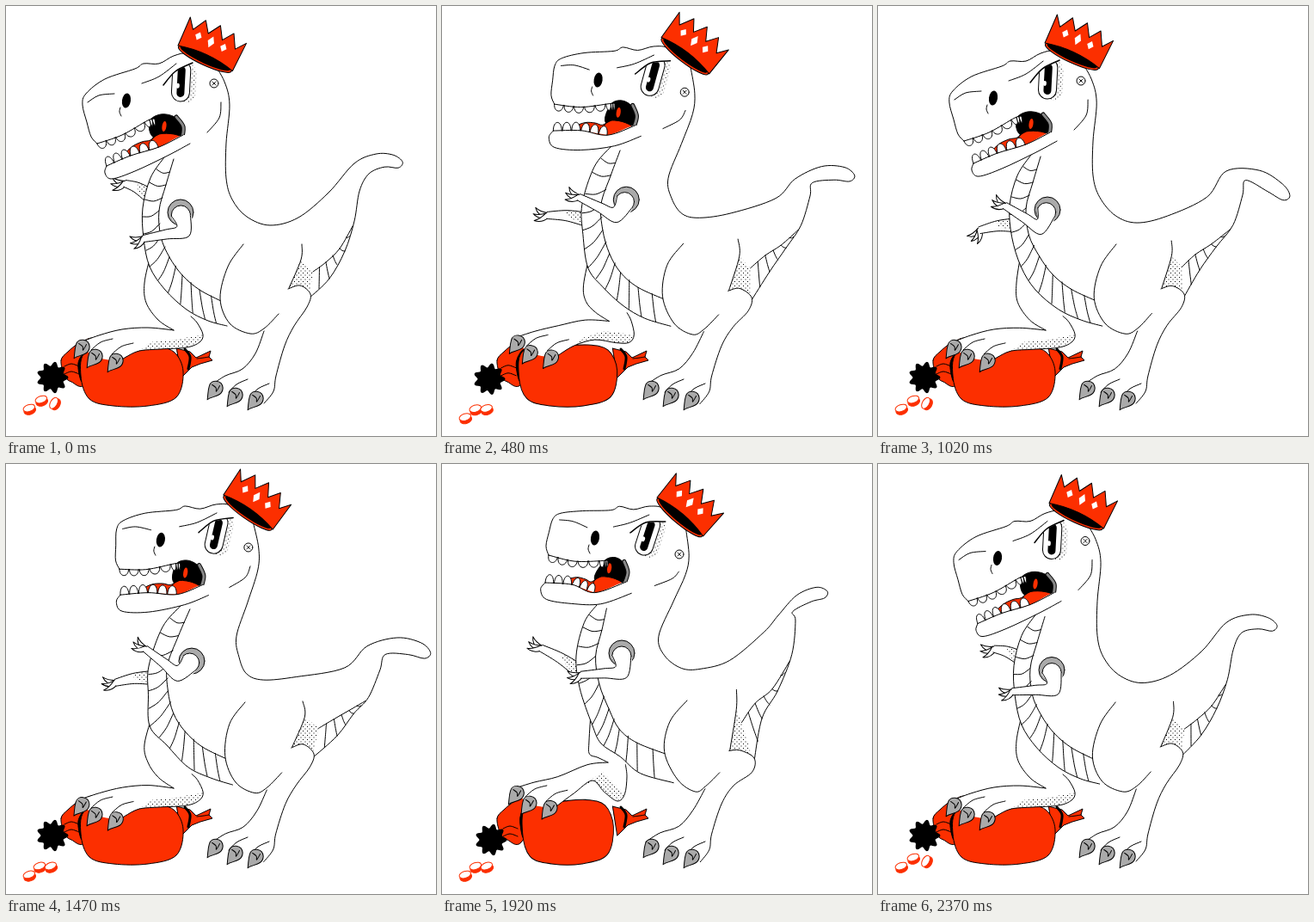
An HTML page with a canvas for the animation above (2400 ms loop, 500x500 px).

```html
<!DOCTYPE html>
<html lang="en">
<head>
<meta charset="utf-8">
<title>Stomping dinosaur</title>
<style>
  html, body { margin: 0; height: 100%; overflow: hidden; background: #fff; }
  canvas { display: block; }
</style>
</head>
<body>
<canvas id="stage" width="500" height="500"></canvas>
<script>
const ctx = document.getElementById('stage').getContext('2d');
const RED = '#fc2f00', GREY = '#aaa', INK = '#000', PAPER = '#fff';
const { PI, cos, sin, hypot } = Math;

// The dinosaur is drawn once, leaning left; handles bend it into the other poses.
const shapes = {
  back: '240,64 254,88 260,115 256,160 256,200 263,225 280,245 307,255 340,246 375,217',
  tail: '405,183 430,172 450,173 461,181 456,188 440,187 422,195 411,215 405,250 394,285 376,317 352,340',
  tailInner: '403,256 388,282 372,298 357,309',
  belly: '184,176 168,200 159,235 160,270 167,303 185,330 210,353 235,366 257,372',
  bellyInner: '195,178 186,208 178,238 180,268 190,292 205,313 225,330 252,344',
  fold: '344,277 343,295 329,328',
  thigh: '276,277 258,303 249,340 260,369 284,381 300,375 317,358',
  knee: '328,329 342,325 354,335 350,350 335,372 324,395 314,430 311,448 300,462',
  shin: '300,378 290,404 275,422 255,430 240,440',
  farThigh: '168,290 161,322 163,345 177,365 195,377',
  footTop: '195,377 165,374 135,376 108,383 84,392',
  footBottom: '215,361 222,368 229,382 225,391 210,397 180,399 155,401 138,409 131,414',
  toes: '89,397 104,408 128,413',
  head: '240,64 213,55 195,58 178,67 160,67 150,73 115,85 93,102 89,115 94,135 99,152 106,160',
  lip: '106,160 135,150 165,133 173,131',
  mouth: '167,134 180,126 196,129 204,140 203,153 172,153',
  tongue: '138,174 146,164 158,158 168,156 178,149 195,149 203,154 180,164 160,169',
  jaw: '117,186 145,174 178,164 206,150 214,160 188,174 150,192 123,201 115,194',
  brow: '183,92 197,76 217,66',
  ridge: '158,90 178,82 198,67',
  snoutLine: '95,112 108,104 126,102',
  cheek: '250,112 248,130 234,147',
  spots: '140,110 203,90 242,90 184,140 200,46 203,240'
};
const parse = text => text.split(' ').map(pair => pair.split(',').map(Number));
for (const name in shapes) shapes[name] = parse(shapes[name]);

// x, y, then the shift when leaning right, with the foot lifted, and at the stomp
const upperHandles = [
  [140, 110, 40, -22, 38, -24], [242, 90, 40, 7, 34, 15], [106, 160, 26, -38, 18, -54],
  [117, 186, 16, -34, 3, -48], [204, 140, 24, -10, 10, -14], [200, 46, 53, -10, 50, -7],
  [256, 160, 25, 1, 13, 0], [184, 176, 19, -11, -4, -12], [203, 240, 13, -11, 6, -20],
  [159, 235, 7, 0, -3, -12], [256, 205, 11, 0, -5, 0], [308, 255, -8, -4, -6, -17],
].map(handle => [...handle, -6, -3]);
const lowerHandles = [
  [405, 183, 15, 29, -14, -7, 0, 9], [411, 215, 24, 25, 0, -33, 13, 5],
  [461, 181, 33, 39, -13, -33, 18, 40], [376, 317, 9, -1, -4, -21, -2, -10],
  [276, 277, 2, 0, 9, -2, 1, 0], [260, 369, 7, 1, 14, -2, 4, 0],
  [354, 335, 4, 2, 9, 7, 2, 0], [185, 330, 2, -3, 0, -5, -2, 0], [161, 322, 0, 4, 10, 0, 0, 0],
  [195, 377, 0, 0, -2, -30, 0, 0], [228, 385, 0, 0, -18, 2, 0, 0], [106, 404, 0, 0, -2, -13, 0, 0],
  [270, 450, 0, 0, 0, 0, 0, 0], [318, 415, 0, 0, 0, 0, 0, 0]
];
const handles = [...upperHandles, ...lowerHandles];

// Joint settings for the four poses
const joints = {
  tilt: [3, 13, 18, 3], upperArm: [82, 140, 92, 116], foreArm: [169, 218, 176, 212],
  farX: [165, 170, 160, 160], farY: [219, 249, 241, 255],
  farWristX: [138, 127, 115, 118], farWristY: [206, 255, 214, 261], farHand: [172, 168, 200, 120]
};

function poseWeights(time) {
  const stops = [45, 320, 720, 1010, 1245];
  let phase = time % 1200;
  if (phase < 45) phase += 1200;
  const i = stops.findIndex((s, k) => phase < stops[k + 1]);
  const x = (phase - stops[i]) / (stops[i + 1] - stops[i]);
  const w = [0, 0, 0, 0], s = x * x * (3 - 2 * x);
  w[i] = 1 - s;
  w[(i + 1) % 4] = s;
  // small follow-through on both leans
  return [1.1 * w[0] - 0.09 * w[1], 1.09 * w[1], w[2], w[3] - 0.1 * w[0]];
}

// Moving least squares: every point takes the turn, scale and shift of the handles near it.
function makeWarp([, lean, lift, stomp]) {
  const moved = handles.map(([x, y, ax, ay, bx, by, cx, cy]) =>
    [x, y, x + lean * ax + lift * bx + stomp * cx, y + lean * ay + lift * by + stomp * cy]);
  return ([x, y]) => {
    const weights = moved.map(h => 1 / ((h[0] - x) ** 2 + (h[1] - y) ** 2 + 9) ** 2);
    const total = weights.reduce((a, b) => a + b);
    const [mx, my, nx, ny] = [0, 1, 2, 3].map(j => moved.reduce((sum, h, i) => sum + h[j] * weights[i], 0) / total);
    let re = 0, im = 0, size = 0;
    moved.forEach((h, i) => {
      const px = h[0] - mx, py = h[1] - my, qx = h[2] - nx, qy = h[3] - ny;
      re += weights[i] * (px * qx + py * qy);
      im += weights[i] * (px * qy - py * qx);
      size += weights[i] * (px * px + py * py);
    });
    const dx = x - mx, dy = y - my;
    return [nx + (re * dx - im * dy) / size, ny + (im * dx + re * dy) / size];
  };
}

const dots = (() => {
  const tile = document.createElement('canvas');
  tile.width = tile.height = 5;
  const g = tile.getContext('2d');
  g.fillRect(0, 0, 1, 1);
  g.fillRect(2.5, 2.5, 1, 1);
  return ctx.createPattern(tile, 'repeat');
})();

// Catmull-Rom curve through the points
function trace(pts, closed) {
  const n = pts.length;
  const get = i => closed ? pts[(i + n) % n] : pts[Math.max(0, Math.min(n - 1, i))];
  ctx.beginPath();
  ctx.moveTo(...pts[0]);
  for (let i = 0; i < (closed ? n : n - 1); i++) {
    const [a, b, c, d] = [get(i - 1), get(i), get(i + 1), get(i + 2)];
    ctx.bezierCurveTo(b[0] + (c[0] - a[0]) / 6, b[1] + (c[1] - a[1]) / 6,
      c[0] - (d[0] - b[0]) / 6, c[1] - (d[1] - b[1]) / 6, c[0], c[1]);
  }
}

function paint(fill, line = INK, width = 1) {
  if (fill) { ctx.fillStyle = fill; ctx.fill(); }
  if (line) { ctx.strokeStyle = line; ctx.lineWidth = width; ctx.stroke(); }
}
const stroke = (pts, width) => { trace(pts); paint(null, INK, width); };
const strokes = (...lines) => lines.forEach(line => stroke(line));
const blob = (pts, fill) => { trace(pts, true); paint(fill); };
const area = (pts, fill) => { trace(pts); paint(fill, null); };

function poly(pts, fill, line = null) {
  ctx.beginPath();
  pts.forEach(p => ctx.lineTo(...p));
  ctx.closePath();
  paint(fill, line);
}

function oval(x, y, rx, ry, fill, line, tilt = 0) {
  ctx.beginPath();
  ctx.ellipse(x, y, rx, ry, tilt, 0, 2 * PI);
  paint(fill, line);
}

function place(x, y, degrees, draw) {
  ctx.save();
  ctx.translate(x, y);
  ctx.rotate(degrees * PI / 180);
  draw();
  ctx.restore();
}

function along(pts, u) {
  const f = u * (pts.length - 1), i = Math.min(pts.length - 2, Math.floor(f)), k = f - i;
  return [0, 1].map(j => pts[i][j] * (1 - k) + pts[i + 1][j] * k);
}

function ribs(outer, inner, count, sag) {
  for (let i = 1; i < count; i++) {
    const a = along(outer, i / count), b = along(inner, i / count);
    stroke([a, [(a[0] + b[0]) / 2, (a[1] + b[1]) / 2 + sag], b]);
  }
}

function teeth(line, count, height) {
  for (let i = 0; i < count; i++) {
    const a = along(line, i / count), b = along(line, (i + 0.92) / count);
    const dx = b[0] - a[0], dy = b[1] - a[1], k = height / hypot(dx, dy);
    ctx.beginPath();
    ctx.moveTo(...a);
    ctx.bezierCurveTo(a[0] - dy * k, a[1] + dx * k, b[0] - dy * k, b[1] + dx * k, ...b);
    paint(PAPER);
  }
}

function claw([x, y]) {
  place(x, y, 8, () => {
    ctx.beginPath();
    ctx.moveTo(8, -2);
    ctx.bezierCurveTo(6, -11, -7, -11, -8, -2);
    ctx.bezierCurveTo(-9, 4, -8, 8, -8, 14);
    ctx.bezierCurveTo(-4, 9, 9, 9, 8, -2);
    paint(GREY);
    stroke([[-5, -4], [0, -1], [1, 3], [4, -4]]);
  });
}

function hand([x, y], angle) {
  for (const spread of [28, 0, -28]) place(x, y, angle + spread, () => {
    ctx.beginPath();
    ctx.moveTo(0, -3);
    ctx.quadraticCurveTo(10, -5, 16, 2);
    ctx.quadraticCurveTo(9, 0, 0, 3);
    paint(PAPER);
  });
}

// Tapering limb through joints given as [point, radius]
function limb(parts) {
  const side = sign => parts.map(([p, r], i) => {
    const a = parts[Math.max(0, i - 1)][0], b = parts[Math.min(parts.length - 1, i + 1)][0];
    const k = sign * r / hypot(b[0] - a[0], b[1] - a[1]);
    return [p[0] - (b[1] - a[1]) * k, p[1] + (b[0] - a[0]) * k];
  });
  const left = side(1), right = side(-1);
  area([...left.slice().reverse(), ...right], PAPER);
  strokes(left, right);
  return { left, right };
}

function drawCoins(hop) {
  [[27, 478], [39, 468], [52, 468]].forEach(([x, y], i) => {
    const spin = i === 2 ? -20 - 40 * hop : -18;
    place(x + hop * i * 2, y - hop * (i === 2 ? 6 : 10), spin, () => {
      oval(0, 2.5, 7, 4.5, RED, RED);
      oval(0, -0.5, 7, 4, PAPER, RED);
    });
  });
}

function drawBag(lift) {
  const neck = parse('64,412 72,402 85,392 102,386 112,398 92,440 76,437 68,430');
  const body = parse('93,402 87,430 97,457 125,465 165,465 198,455 206,425 195,402 170,396 135,398');
  const end = parse('198,398 214,402 221,409 238,401 236,408 240,412 226,416 216,420 204,432');
  blob(neck, RED);
  const bx = 54 + 3 * lift, by = 432 + 5 * lift;
  poly(Array.from({ length: 80 }, (_, i) => {
    const a = i * PI / 40, r = 16 + 2.5 * cos(9 * a);
    return [bx + r * cos(a), by + r * sin(a)];
  }), INK);
  for (const dy of [-13, -4]) stroke([[bx + 14, by + dy], [bx + 22, by + dy - 3], [bx + 31, by + dy]]);
  poly(end, RED, INK);
  stroke([[208, 399], [214, 408], [212, 422]], 3);
  stroke([[222, 410], [230, 409], [236, 408]]);
  ctx.save();
  ctx.translate(146, 466);
  ctx.scale(1 - 0.11 * lift, 1 + 0.08 * lift);
  ctx.translate(-146, -466);
  blob(parse('94,401 84,415 88,437 95,425'), INK);
  blob(body, RED);
  ctx.restore();
}

function drawFarLeg(p) {
  const sole = p.footBottom;
  area([...p.farThigh, ...p.footTop, ...p.toes, ...sole.slice().reverse()], PAPER);
  poly([...sole.slice(2, 7), ...sole.slice(5, 7).reverse().map(([x, y]) => [x + 12, y - 10])], dots);
  strokes(p.farThigh, p.footTop, sole);
  p.toes.slice(1).forEach(([x, y]) => stroke([[x - 5, y - 8], [x + 6, y - 17], [x + 20, y - 21]]));
  p.toes.forEach(claw);
}

function drawBody(p) {
  const spine = [...p.back, ...p.tail], edge = p.tail.slice(-4);
  area([...spine, ...p.belly.slice().reverse()], PAPER);
  strokes(spine, p.belly, p.bellyInner);
  ribs(p.belly, p.bellyInner, 14, 3);
  poly([p.fold[1], p.tailInner[3], edge[3], p.fold[2]], dots);
  stroke(p.tailInner);
  ribs(edge, p.tailInner, 6, 1);
  stroke(p.fold);
}

function drawNearLeg(p) {
  area([...p.knee, ...p.shin.slice().reverse(), ...p.thigh.slice(4)], PAPER);
  area(p.thigh, PAPER);
  strokes(p.thigh, p.knee, p.shin);
  for (const [x, y] of [[259, 449], [284, 454]]) stroke([[x, y], [x + 9, y - 9], [x + 22, y - 15]]);
  [[244, 445], [267, 453], [291, 457]].forEach(claw);
}

function drawFarArm(j) {
  const wrist = [j.farWristX, j.farWristY];
  const elbow = [(j.farX + wrist[0]) / 2, (j.farY + wrist[1]) / 2 - 2];
  hand(wrist, j.farHand);
  const { left, right } = limb([[[j.farX, j.farY], 8], [elbow, 6], [wrist, 4]]);
  poly([elbow, ...left.slice(0, 2).reverse(), right[0]], dots);
}

function drawNearArm([x, y], j) {
  const step = (p, angle, length) => [p[0] + length * cos(angle * PI / 180), p[1] + length * sin(angle * PI / 180)];
  const top = step([x, y], j.upperArm, 3), elbow = step(top, j.upperArm, 19);
  const middle = step(elbow, j.foreArm, 20), wrist = step(elbow, j.foreArm, 47);
  oval(x, y, 15, 15, GREY, INK);
  oval(...top, 11, 11, PAPER, INK);
  hand(wrist, j.foreArm - 15);
  limb([[top, 11], [elbow, 9], [middle, 5.5], [wrist, 4]]);
}

function drawEye([x, y], brow, tilt, blink) {
  const lid = y - 28 + 36 * blink;
  ctx.save();
  ctx.beginPath();
  brow.forEach(pt => ctx.lineTo(...pt));
  ctx.lineTo(x + 40, y + 40);
  ctx.lineTo(x - 40, y + 40);
  ctx.clip();
  ctx.beginPath();
  ctx.rect(x - 40, lid, 80, 80);
  ctx.clip();
  place(x, y, tilt, () => {
    const pill = (px, py, w, h, fill, line) => {
      ctx.beginPath();
      ctx.roundRect(px, py, w, h, w / 2);
      paint(fill, line);
    };
    pill(-2, -24, 20, 46, dots, null);
    pill(-10, -26, 21, 47, PAPER, INK);
    pill(-4, -20, 9, 36, INK, null);
    oval(-3, 3, 2, 3, PAPER, null);
  });
  ctx.restore();
  if (blink) stroke([[x - 13, lid], [x + 12, lid]], 1.5);
  stroke(brow, 1.5);
}

function drawCrown([x, y], angle) {
  place(x, y, angle, () => {
    oval(35, 1, 34, 7, RED, INK);
    oval(35, 0, 32, 6, INK, null);
    ctx.beginPath();
    ctx.moveTo(0, 0);
    for (let i = 0; i < 9; i++) {
      const arch = 6 * sin(i * PI / 8);
      ctx.lineTo(-1 + 9 * i, -arch - (i % 2 ? 22 : 36));
    }
    ctx.lineTo(70, 0);
    ctx.quadraticCurveTo(35, -9, 0, 0);
    paint(RED);
    [[17, 5], [33, 7], [49, 5]].forEach(([u, h]) =>
      poly([[u, -20 - h], [u + 4, -20], [u, -20 + h], [u - 4, -20]], PAPER));
  });
}

function drawHead(p, tilt, blink) {
  const [nostril, eye, ear, uvula, crown] = p.spots;
  area([...p.head, ...p.lip], PAPER);
  blob(p.mouth, INK);
  trace(p.mouth.slice(2, 5).map(([x, y]) => [x + 2, y]));
  paint(null, INK, 5);
  paint(null, '#888', 3);
  oval(...uvula, 2.5, 6, RED, null, 0.15);
  blob(p.tongue, RED);
  const [tx, ty] = p.tongue[4];
  stroke([[tx, ty], [tx - 7, ty + 4], [tx - 9, ty + 9]]);
  area(p.jaw, PAPER);
  teeth(p.jaw.slice(0, 3), 6, -13);
  strokes(p.jaw.slice(0, 4), [...p.jaw.slice(4), p.jaw[0]]);
  teeth(p.lip, 8, 10);
  strokes(p.lip, p.head, p.ridge, p.snoutLine, p.cheek);
  oval(...nostril, 5, 8.5, INK, null, 0.15);
  stroke([[-7, 8], [-8, 13], [-6, 18]].map(([x, y]) => [nostril[0] + x, nostril[1] + y]));
  oval(...ear, 5, 5, PAPER, INK);
  for (const d of [-2, 2]) stroke([[ear[0] - 2, ear[1] - d], [ear[0] + 2, ear[1] + d]]);
  drawEye(eye, p.brow, tilt, blink);
  drawCrown(crown, tilt + 22);
}

function draw(time) {
  const weights = poseWeights(time), warp = makeWarp(weights), p = {}, j = {};
  for (const name in shapes) p[name] = shapes[name].map(warp);
  for (const name in joints) j[name] = joints[name].reduce((sum, v, i) => sum + v * weights[i], 0);
  const lift = weights[2];
  const blink = Math.max(0, 1 - Math.abs(time - 240) / 100);
  ctx.fillStyle = PAPER;
  ctx.fillRect(0, 0, 500, 500);
  ctx.lineJoin = ctx.lineCap = 'round';
  drawCoins(1 - weights[1] - lift);
  drawBag(lift);
  drawFarArm(j);
  drawFarLeg(p);
  drawBody(p);
  drawNearLeg(p);
  drawNearArm(p.spots[5], j);
  drawHead(p, j.tilt, blink);
}

const start = performance.now();
function tick() {
  const elapsed = (performance.now() - start) % 2400;
  draw(Math.floor(elapsed / 30) * 30);
  requestAnimationFrame(tick);
}
tick();
</script>
</body>
</html>
```
